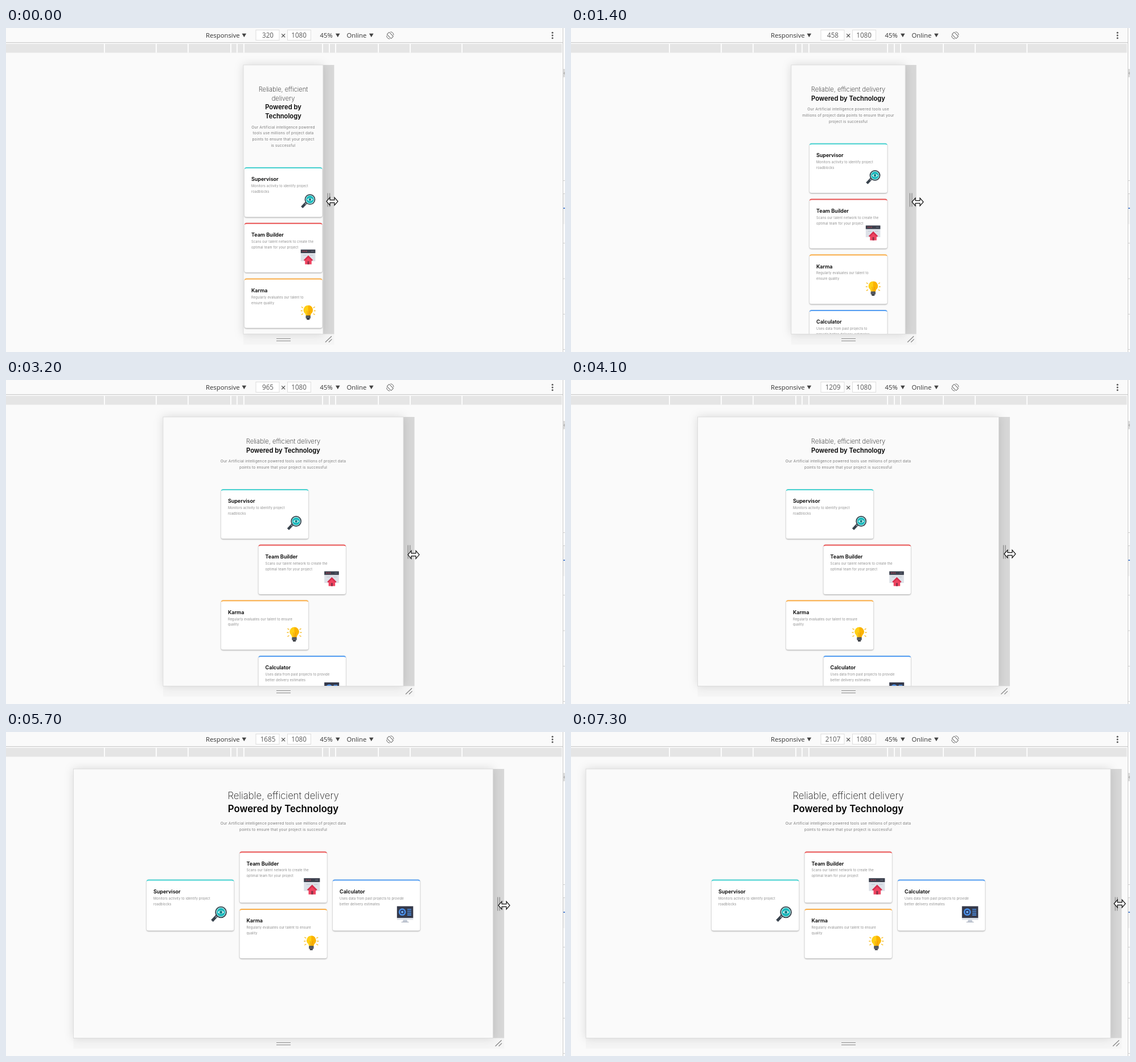
An HTML page that plays this animation: 982x570 px, repeating every 8.1 s.

```html
<!DOCTYPE html>
<html lang="en">
<head>
<meta charset="utf-8">
<title>Responsive layout</title>
<style>
html, body { margin: 0; width: 100%; height: 100%; overflow: hidden; background: #fafafa; }
svg { display: block; }
text { font-family: Inter, "Open Sans", sans-serif; }
.bar text { font: 11.3px "Open Sans", "Noto Sans", sans-serif; fill: #333; }
.bar .size { font-size: 11.7px; fill: #5a5a5a; text-anchor: middle; }
.head { text-anchor: middle; }
.thin { font-weight: 200; fill: #111; }
.bold { font-weight: 600; fill: #000; }
.lead { font-size: 6.56px; letter-spacing: .03em; fill: #7c7c7c; }
.title { font-size: 9px; font-weight: 600; fill: #000; }
.desc { font-size: 5.69px; letter-spacing: .03em; fill: #8c8c8c; }
.card { filter: drop-shadow(0 1px 1px rgba(0,0,0,.36)); }
.screen { filter: drop-shadow(0 0 8px rgba(0,0,0,.13)); }
</style>
</head>
<body>
<svg width="982" height="570" viewBox="0 0 982 570">
  <clipPath id="view"><rect y="65" width="982" height="473"/></clipPath>
  <g id="chrome" class="bar"></g>
  <g id="stage"></g>
</svg>
<script>
const LOOP = 8100, STEP = 100, SCALE = 0.4375, MID = 487, TOP = 65, BOTTOM = 538.5;
const $ = id => document.getElementById(id);

// Drag strokes: first step, last step, device width, pointer x, pointer y
const strokes = [
  [700, 1000, 348, 579, 305], [1100, 1400, 458, 609, 306], [1500, 1500, 500, 615, 307],
  [1600, 2200, 680, 652, 308], [2300, 2400, 752, 671, 308], [2800, 3400, 1050, 734, 307],
  [3600, 3600, 1113, 748, 306], [3800, 3900, 1155, 760, 306], [4100, 4100, 1209, 771, 306],
  [4300, 4300, 1273, 781, 306], [4500, 4700, 1378, 806, 307], [4900, 4900, 1456, 829, 307],
  [5200, 5200, 1538, 848, 307], [5400, 5500, 1640, 862, 306], [5700, 5700, 1685, 875, 305],
  [5900, 6000, 1726, 883, 304], [6200, 6200, 1776, 897, 303], [6400, 6400, 1884, 919, 303],
  [6700, 6900, 2023, 946, 303], [7100, 7100, 2055, 958, 302], [7300, 7300, 2107, 964, 302]
];

function poseAt(t) {
  let pose = [320, 573, 305];
  for (const [first, last, ...goal] of strokes) {
    if (t < first) break;
    const part = (Math.min(t, last) - first + STEP) / (last - first + STEP);
    pose = pose.map((v, i) => v + (goal[i] - v) * part);
  }
  return pose;
}

const rect = (x, y, w, h, fill, extra = '') =>
  `<rect x="${x}" y="${y}" width="${w}" height="${h}" fill="${fill}" ${extra}/>`;
const disc = (x, y, r, fill) => `<circle cx="${x}" cy="${y}" r="${r}" fill="${fill}"/>`;
const line = (d, color, width = 1) =>
  `<path d="${d}" fill="none" stroke="${color}" stroke-width="${width}"/>`;
const shape = (d, fill) => `<path d="${d}" fill="${fill}"/>`;
const label = (x, y, str, cls = '', size = '') =>
  `<text x="${x}" y="${y}" class="${cls}" ${size && `font-size="${size}"`}>${str}</text>`;

// Icons sit in a box of 26 by 26
const icons = {
  lens: line('M10 15L2 23.5', '#37414b', 4.4) + line('M10.5 15L7.5 18', '#8d99a3', 2) +
    disc(16.2, 9.6, 9.4, '#35434d') + disc(16.2, 9.6, 7.7, '#b5eceb') + disc(16.2, 9.6, 6.6, '#18b9bd') +
    shape('M11 9.6Q16.2 4 21.4 9.6Q16.2 15.2 11 9.6Z', '#d8f8f7') + disc(16.2, 9.6, 2.3, '#197f88'),
  house: rect(0, 0, 25.6, 20.5, '#dde1e8') + rect(0, 0, 25.6, 6.2, '#3b3f4c') +
    [4, 7, 10].map(x => disc(x, 3, 1, '#b94255')).join('') + rect(18, 2.5, 5, 1, '#697080') +
    line('M4 10H10M16 10H22', '#b9c0cb', .8) +
    shape('M13.2 12L19 17.5V26H7.5V17.5Z', '#ef4360') +
    shape('M13.2 10.2L21.5 18.5L19.5 20L13.2 14L7 20L5 18.5Z', '#d62f4d') +
    rect(11.8, 20.5, 3, 5.5, '#8f3147'),
  bulb: line('M0 10H3M23 10H26M1 3L4 4.8M25 3L22 4.8M1 17L4 15.2M25 17L22 15.2', '#f5bd28', 1.4) +
    shape('M13 .5A8.2 8.2 0 0 0 7.8 15L9 18.5H17L18.2 15A8.2 8.2 0 0 0 13 .5Z', '#ffcf16') +
    shape('M13 .5A8.2 8.2 0 0 1 18.2 15L17 18.5H13Z', '#fbb300') +
    line('M11 10L12 18M15 10L14 18', '#e49316', .8) +
    rect(8.8, 18.3, 8.4, 5.2, '#464a51', 'rx="1"') + line('M8.8 21H17.2', '#81878e', .7) +
    rect(10.5, 23.5, 5, 2.3, '#30343a'),
  monitor: rect(0, 0, 26, 19, '#35394a') + rect(0, 19, 26, 3, '#dfe3ea') +
    shape('M10 22H16L17 25H9Z', '#c3cad5') + rect(7, 25, 12, 1, '#a9b1be') +
    disc(8.5, 9.3, 5.8, '#4b91eb') + disc(8.5, 9.3, 3.5, '#273a68') + disc(8.5, 9.3, 1.8, '#72b1f6') +
    line('M16.5 5H23M16.5 8H23M16.5 11H23M16.5 14H23', '#4b91eb', 1.5)
};

const cards = [
  ['Supervisor', '#45d2d1', 'lens', ['Monitors activity to identify project', 'roadblocks']],
  ['Team Builder', '#ea5454', 'house', ['Scans our talent network to create the', 'optimal team for your project']],
  ['Karma', '#fbae48', 'bulb', ['Regularly evaluates our talent to', 'ensure quality']],
  ['Calculator', '#549ef2', 'monitor', ['Uses data from past projects to', 'provide better delivery estimates']]
];
const roomy = {
  Karma: ['Regularly evaluates our talent to ensure', 'quality'],
  Calculator: ['Uses data from past projects to provide', 'better delivery estimates']
};

function card([title, color, icon, desc], x, y, w, h, size, inset) {
  const lines = w > 140 && roomy[title] || desc;
  const edge = `M${x} ${y + 3.5}a3.5 3.5 0 0 1 3.5 -3.5h${w - 7}a3.5 3.5 0 0 1 3.5 3.5q-1 -1.5 -3.5 -1.5h${7 - w}q-2.5 0 -3.5 1.5z`;
  return `<g class="card">${rect(x, y, w, h, '#fff', 'rx="3.5"')}</g>` + shape(edge, color) +
    label(x + 12, y + 24.3, title, 'title') +
    lines.map((s, i) => label(x + 12, y + 35.2 + 9.8 * i, s, 'desc')).join('') +
    `<g transform="translate(${x + w - inset} ${y + 47}) scale(${size / 26})">${icons[icon]}</g>`;
}

const words = ('Our Artificial intelligence powered tools use millions of project data ' +
  'points to ensure that your project is successful').split(' ');

// Word indexes where the lead text wraps
function wraps(w) {
  if (w < 352) return [4, 10, 16];
  if (w < 390) return [5, 12];
  if (w < 500) return [6, 15];
  if (w < 528) return [8, 17];
  return [w < 553 ? 8 : w < 597 ? 9 : 10];
}

function page(w) {
  const wide = w >= 1440, stagger = w >= 768, narrow = w < 352;
  const size = wide ? 16.75 : 11.2, pitch = wide ? 23.6 : 15.7;
  const heads = narrow
    ? [['Reliable, efficient', 'thin'], ['delivery', 'thin'], ['Powered by', 'bold'], ['Technology', 'bold']]
    : [['Reliable, efficient delivery', 'thin'], ['Powered by Technology', 'bold']];
  let y = wide ? 117.8 : 111.9;
  let out = '';
  for (const [str, cls] of heads) {
    out += label(MID, y, str, 'head ' + cls, size);
    y += pitch;
  }
  y += wide ? -1.6 : 1.8;
  const cuts = [0, ...wraps(w), words.length];
  for (let i = 0; i < cuts.length - 1; i++) {
    out += label(MID, y, words.slice(cuts[i], cuts[i + 1]).join(' '), 'head lead');
    y += 10.9;
  }
  if (wide) {
    const spots = [[247, 259.5, 90], [410.5, 210.2, 90], [410.5, 311, 87.3], [574, 259.5, 90]];
    return out + cards.map((c, i) => card(c, spots[i][0], spots[i][1], 153.3, spots[i][2], i === 2 ? 26 : 28.5, 40.5)).join('');
  }
  const top = y + 25;
  return out + cards.map((c, i) => {
    const x = !stagger ? 419 : i % 2 ? 443.6 : 377.9;
    return card(c, x, top + 97.7 * i, stagger ? 153.3 : 136.5, 87.3, 26, 37.7);
  }).join('');
}

function toolbar() {
  const arrow = x => shape(`M${x} 9.8h7.6l-3.8 6.4z`, '#444');
  const ticks = [320, 375, 425, 768, 1024, 1440].flatMap(w => {
    const half = w * SCALE / 2 - .9;
    return [MID - half, MID + half];
  });
  return rect(0, 0, 982, 570, '#fafafa') + rect(0, 25, 978, 1.2, '#cbcbcb') +
    rect(0, 28, 976.5, 15.5, '#e5e5e5') + ticks.map(x => rect(x - .9, 28, 1.8, 15.5, '#fff')).join('') +
    label(351, 17, 'Responsive') + arrow(414.5) +
    rect(439, 3.5, 41, 18, '#fff', 'stroke="#dedede"') + rect(494.5, 3.5, 41, 18, '#fff', 'stroke="#dedede"') +
    line('M484.2 10.4l6 6m0-6l-6 6', '#444', 1.1) + label(514.6, 17, '1080', 'size') +
    label(551.5, 17, '45%') + arrow(579) + label(598.5, 17, 'Online') + arrow(638) +
    '<g transform="translate(674.8 13) rotate(-45)">' +
    rect(-2.8, -5.3, 5.6, 10.6, 'none', 'rx="1" stroke="#666"') + '</g>' +
    line('M668.6 13.5A6.2 6.2 0 0 0 674.3 19.2M681 12.5A6.2 6.2 0 0 0 675.3 6.8', '#666') +
    [8.3, 13, 17.7].map(y => disc(960, y, 1.5, '#555')).join('') +
    rect(978, 0, 4, 570, '#fff') + rect(979, 291, 3, 54, '#f4f4f4') + rect(979, 72, 3, 14.5, '#dcdcdc') +
    line('M982 77.5L980 79.5L982 81.5', '#777', .8) +
    [268, 291, 378, 440.5, 503, 565].map(y => rect(979, y, 3, 1, '#d0d0d0')).join('') +
    rect(979, 316.3, 3, 1.6, '#3b74d0') + rect(978, 0, 1, 570, '#c8c8c8');
}

function stage(t) {
  const [w, px, py] = poseAt(t);
  const half = w * SCALE / 2, left = MID - half, right = MID + half, tall = BOTTOM - TOP;
  const grip = t >= 6400 && t < 6700 ? '#e4e4e4' : '#d7d7d7';
  return rect(left, BOTTOM, half * 2 + 19.5, 18.5, '#f5f5f5') + rect(right, TOP, 19.5, tall, grip) +
    rect(left, TOP, half * 2, tall, '#fafafa', 'class="screen" stroke="#dadada" stroke-width=".9"') +
    line(`M${right + 8.2} 290.5v24m3.5 -24v24`, '#858585', 1.2) +
    line('M475 546.5h25m-25 4h25', '#8c8c8c', 1.2) +
    line(`M${right + 4} 552.8l11 -10.6m-5 10.6l5.5 -5.4`, '#858585', 1.2) +
    `<g clip-path="url(#view)">${page(w)}</g>` +
    `<g class="bar">${label(460, 17, Math.round(w), 'size')}</g>` +
    `<path transform="translate(${px} ${py})" d="M-10 0L-4 -7V-2.4H4V-7L10 0L4 7V2.4H-4V7Z" fill="#fff" stroke="#111" stroke-width="1.2"/>`;
}

$('chrome').innerHTML = toolbar();
let shown = -1;
function tick() {
  const t = Math.floor(performance.now() % LOOP / STEP) * STEP;
  if (t !== shown) $('stage').innerHTML = stage(shown = t);
  requestAnimationFrame(tick);
}
tick();
</script>
</body>
</html>
```
